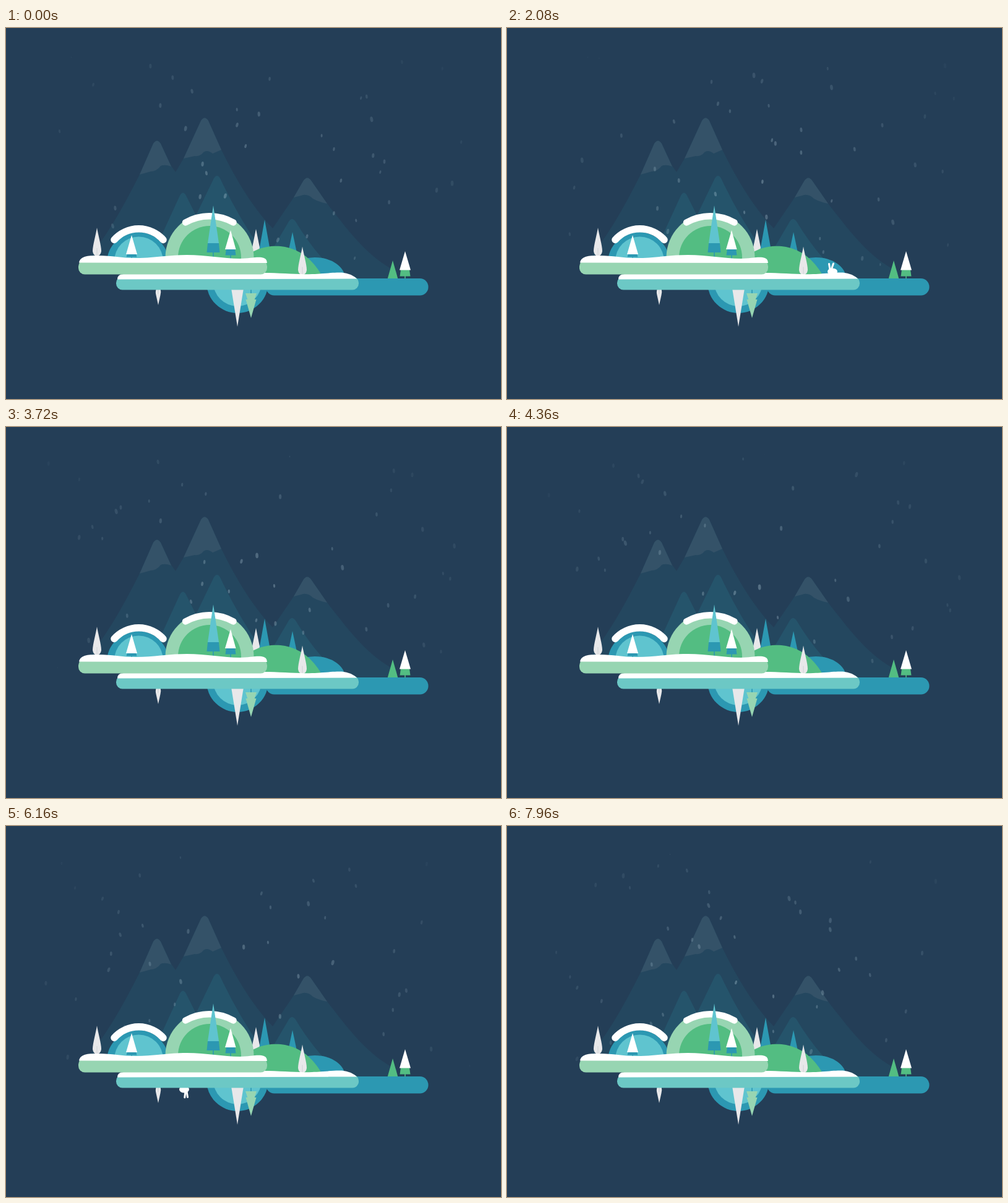
Animation, 800 px wide and 600 px high, one loop 8000 ms. Source, as an HTML page:

```html
<!DOCTYPE html>
<html lang="en">
<head>
<meta charset="utf-8">
<title>Winter islands</title>
<style>
  html, body { margin: 0; height: 100%; overflow: hidden; background: #243e57; }
  svg { display: block; width: 100vw; height: 100vh; }
  .ridge { fill: #24475f; }
  .cap { fill: #345268; }
  .ridge2 { fill: #25546b; }
  .blue { fill: #2c98b2; }
  .sky { fill: #5fc4cf; }
  .mint { fill: #97d5b2; }
  .green { fill: #53bd82; }
  .ice { fill: #e8e8ea; }
  .snow { fill: #fff; }
  .drift { fill: none; stroke: #fff; stroke-linecap: round; }
  .trunk { fill: none; stroke: #2c98b2; stroke-width: 1.6; }
  .stem { fill: none; stroke: #cfd2d6; stroke-width: 1; }
  .ear { fill: none; stroke: #fff; stroke-width: 3; stroke-linecap: round; }
</style>
</head>
<body>
<svg viewBox="0 0 800 600">
  <defs>
    <clipPath id="aboveUpper"><rect width="800" height="380"/></clipPath>
    <clipPath id="aboveLower"><rect width="800" height="408"/></clipPath>
    <clipPath id="below"><rect y="415" width="800" height="185"/></clipPath>
    <g id="leafTree">
      <path class="ice" d="M0 0C2 12 7 29 7 38Q6 45.500 0 45.500Q-6 45.500 -7 38C-7 29 -2 12 0 0Z"/>
      <path class="stem" d="M0 33V46"/>
    </g>
    <g id="rabbitBody">
      <ellipse class="snow" cx="0" cy="0" rx="8" ry="5.500"/>
      <path class="ear" d="M-4 -3L-5.500 -12.500"/>
    </g>
    <g id="hat">
      <ellipse fill="#e0625f" rx="10" ry="9"/>
      <circle class="snow" cx="-11" cy="3" r="4"/>
    </g>
  </defs>

  <!-- mountains -->
  <path class="ridge" d="M130 376C168 331 195 278 216 237L238 187Q244 178 250 187L267 223L274 233L287 211L315 150Q321 141 327 150L348 197C375 252 402 294 431 324L465 274L480 248Q487 237 494 248L519 284C552 326 585 372 632 394V408H400V376Z"/>
  <path class="cap" d="M216 237L238 187Q244 178 250 187L267 224Q257 220 250 223Q243 232 234 232Z"/>
  <path class="cap" d="M287 211L315 150Q321 141 327 150L348 197L334 203Q325 196 319 201Q314 208 305 207Z"/>
  <path class="cap" d="M465 274L480 248Q487 237 494 248L519 284Q504 281 496 276Q487 267 477 271Z"/>
  <path class="ridge2" d="M230 376L253 332L281 271Q286 262 291 271L307 303L336 243Q341 235 346 243Q374 303 410 355V376Z"/>
  <path class="ridge2" d="M420 376L457 313Q462 305 468 313Q490 350 518 380V400H420Z"/>

  <g id="flakes" fill="#b9d3e0"></g>

  <!-- far trees and hills -->
  <path class="ice" d="M404 325L412 365H396Z"/>
  <path class="blue" d="M418 310L427 360H409ZM463 330L471 368H455Z"/>
  <g clip-path="url(#aboveLower)">
    <ellipse class="blue" cx="499" cy="405" rx="49" ry="34"/>
    <path class="green" d="M375 381C398 354 429 350 451 354Q488 361 511 401H375Z"/>
  </g>
  <use href="#leafTree" x="479" y="353.500"/>

  <!-- domes -->
  <g id="topHat"><use href="#hat"/></g>
  <g clip-path="url(#aboveUpper)">
    <circle class="blue" cx="213" cy="380" r="50"/>
    <circle class="sky" cx="214.500" cy="377" r="39.500"/>
    <circle class="mint" cx="329" cy="371" r="71.500"/>
    <circle class="green" cx="329" cy="371" r="51"/>
  </g>
  <path class="drift" stroke-width="11.500" d="M175 342.500A53 53 0 0 1 254 342.500"/>
  <path class="drift" stroke-width="10.500" d="M290 314.500A78 78 0 0 1 367.500 314.500"/>

  <!-- trees on the upper island -->
  <path class="trunk" d="M335 360V372M363 362V374M203 367V374"/>
  <path class="sky" d="M335 287L344 348H326Z"/>
  <path class="blue" d="M326 348H344L345.500 363H324.500ZM356 357H370L371.500 367.500H354.500ZM196 365H210L211.500 370.500H194.500Z"/>
  <path class="snow" d="M363 327L371.500 358H354ZM203 335L212 366H194Z"/>
  <use href="#leafTree" x="147" y="323"/>

  <!-- right island -->
  <path class="trunk" style="stroke:#53bd82" d="M645 398V406M625 400V406"/>
  <path class="green" d="M625 376L633.500 406H616.500ZM638 391H652L653.500 401.500H636.500Z"/>
  <path class="snow" d="M645 361L654 391.500H636Z"/>

  <!-- hanging below -->
  <g clip-path="url(#below)">
    <g id="lowHat"><use href="#hat"/></g>
    <circle class="blue" cx="374" cy="411" r="50"/>
    <circle class="sky" cx="374" cy="411" r="39"/>
  </g>
  <rect class="blue" x="420" y="405" width="262.500" height="27.500" rx="13.500"/>
  <path class="ice" d="M364 421H384L374 483Z"/>
  <path class="trunk" d="M396 421V431"/>
  <path class="mint" d="M387 429H405L401 441H391ZM387.500 439H404.500L396 469Z"/>
  <path class="ice" d="M243 421H249.500Q251 427 249.500 432L246 448L242.500 432Q241 427 243 421Z"/>
  <path class="stem" d="M246 422V430"/>

  <g id="topRabbit"><use href="#rabbitBody"/><path class="ear"/></g>
  <g id="lowRabbit"><use href="#rabbitBody"/><path class="ear"/></g>

  <!-- front islands -->
  <rect x="178" y="402" width="392" height="21.500" rx="10" fill="#6cc8c5"/>
  <path class="snow" d="M180 406.500Q180 398 190 398V396H415C445 396 470 399 495 398S528 395 543 395.500Q558 397 567 405.500Z"/>
  <rect class="mint" x="117" y="375" width="305" height="23.500" rx="10.500"/>
  <path class="snow" d="M118 379.500C120 369 132 368 148 368C173 368 185 372 210 372C240 372 262 367 292 367C325 367 350 373 378 373C393 373 403 370 413 371Q422 372 422 380Z"/>
</svg>

<script>
const LOOP = 8000, LIFE = 4400, FLAKES = 46, FALL = 80, SKY_TOP = 42;
const byId = id => document.getElementById(id);
const clamp = v => Math.max(0, Math.min(1, v));
const smooth = v => { v = clamp(v); return v * v * (3 - 2 * v); };

// Repeatable pseudo-random number in 0..1
const random = seed => {
  const v = Math.sin(seed * 127.1 + 11.7) * 43758.5453;
  return v - Math.floor(v);
};

// Rises from 0 to 1 at `start`, falls back before `end`
const peek = (t, start, end, ramp = 260) =>
  smooth((t - start) / ramp) * smooth((end - t) / ramp);

const flakes = Array.from({ length: FLAKES }, () =>
  byId('flakes').appendChild(
    document.createElementNS('http://www.w3.org/2000/svg', 'ellipse')));

function drawFlake(el, i, t) {
  const turn = t / LIFE + (i + random(i)) / FLAKES;
  const lap = Math.floor(turn), age = (turn - lap) * LIFE / 1000;
  const seed = i * 7 + lap * 613;
  const drift = (random(seed + 1) + random(seed + 2) - 1) * 32;
  const x = 65 + random(seed + 3) * 670 + drift * (age - 2);
  const y = SKY_TOP + FALL * age;
  const size = (0.75 + random(seed + 4) * 0.45) *
    clamp(age / 0.2) * clamp((LIFE / 1000 - age) / 0.2);
  const far = Math.hypot((x - 400) / 370, (y - 260) / 270);
  el.setAttribute('rx', 2 * size);
  el.setAttribute('ry', 3.7 * size);
  el.setAttribute('opacity', 0.04 + 0.29 * clamp(1.05 - far));
  el.setAttribute('transform',
    `translate(${x} ${y}) rotate(${-Math.atan2(drift, FALL) * 180 / Math.PI})`);
}

function drawRabbit(id, x, y, angle, out, earTip) {
  const group = byId(id);
  group.setAttribute('transform',
    `translate(${x} ${y}) rotate(${angle}) translate(0 ${22 * (1 - out)})`);
  group.lastElementChild.setAttribute('d', `M-2 -3L${earTip} -13`);
}

function drawHat(id, x, y, angle, out) {
  const group = byId(id);
  group.setAttribute('transform',
    `translate(${x} ${y}) rotate(${angle}) translate(0 ${-20 * out})`);
  group.setAttribute('visibility', out > 0 ? 'visible' : 'hidden');
}

function draw(t) {
  flakes.forEach((el, i) => drawFlake(el, i, t));
  drawRabbit('topRabbit', 526, 394, 0, peek(t, 500, 3200), 1.5);
  const twitch = smooth((t - 5300) / 250);
  drawRabbit('lowRabbit', 288, 426, 180, peek(t, 4500, 6650), 1.8 - 2.6 * twitch);
  drawHat('topHat', 300, 319, -20, peek(t, 2750, 3650));
  drawHat('lowHat', 358, 445, 180, peek(t, 6650, 7800));
}

const begin = performance.now();
function tick() {
  draw((performance.now() - begin) % LOOP);
  requestAnimationFrame(tick);
}
tick();
</script>
</body>
</html>
```
